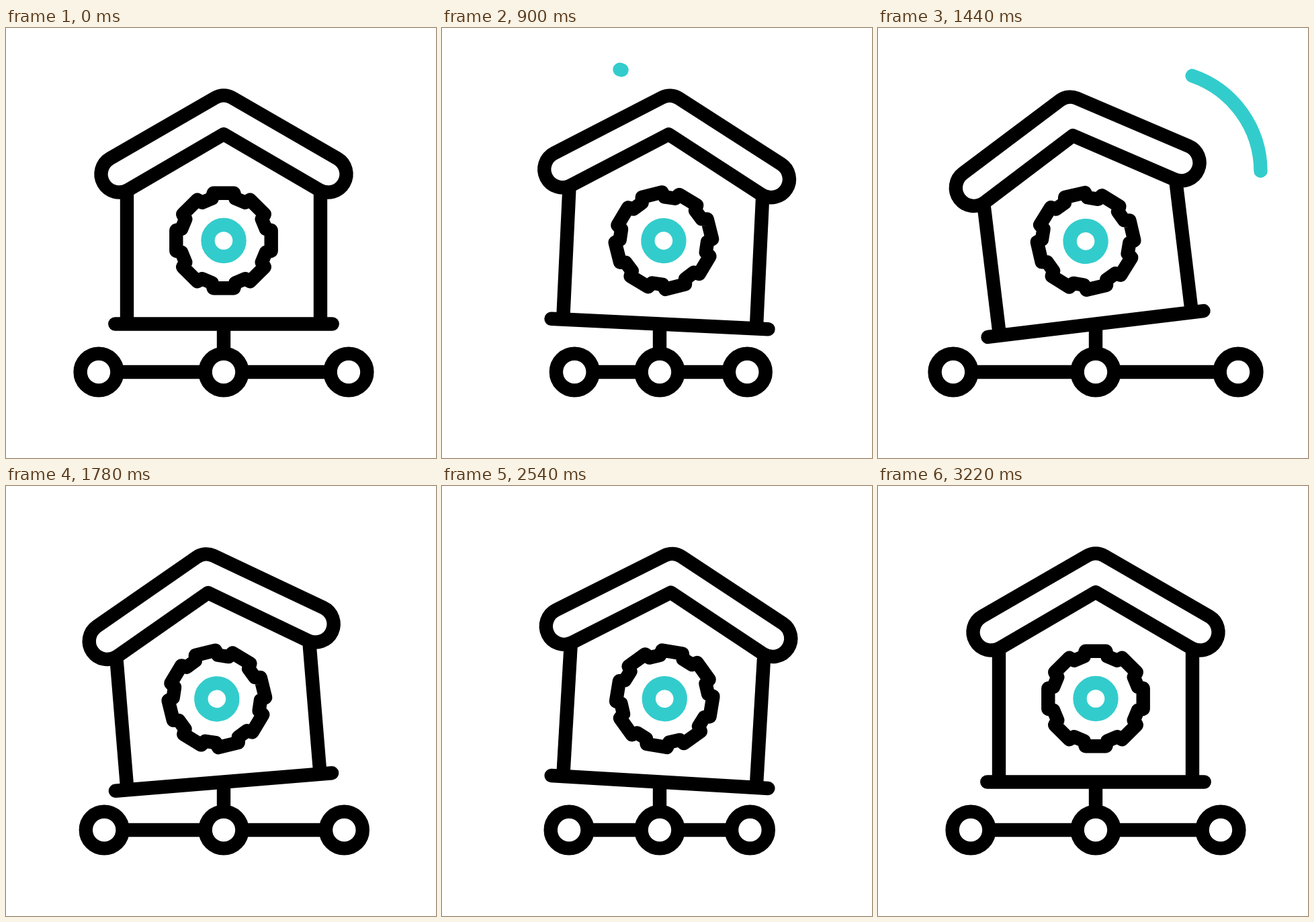
Recreate the animation shown at these times as an HTML page with a canvas. Size 640 by 640 pixels, loop 3240 ms.

```html
<!DOCTYPE html>
<html lang="en">
<head>
<meta charset="utf-8">
<title>House network</title>
<style>
  html, body { margin: 0; width: 100%; height: 100%; overflow: hidden; background: #fff; }
  canvas { display: block; width: 100vmin; height: 100vmin; }
</style>
</head>
<body>
<canvas id="stage" width="640" height="640"></canvas>
<script>
const ctx = document.getElementById('stage').getContext('2d');
const LOOP = 3240, DELAY = 210, STEP = 20;
const INK = '#000', TEAL = '#33cccc';
const RAD = Math.PI / 180, TAU = Math.PI * 2;

// [time, value] keys, counted from the end of the opening hold
const TILT = [[0, 0], [455, 4.8], [1360, -7.6], [2045, 5.3], [2740, 0]];
const LEFT = [[0, 0], [455, 81.5], [1260, -26.5], [2130, 93], [2740, -73.3], [3010, 0]];
const RIGHT = [[0, 0], [455, -77], [1260, 26.5], [2130, -87.5], [2745, 57], [3010, 0]];
const SPIN = [[0, 0], [370, -26.9], [690, -61.9], [1230, -141.2], [1910, -239], [2330, -309], [3010, -360]];

const clamp = p => Math.min(1, Math.max(0, p));
const smooth = p => p * p * (3 - 2 * p);
const ramp = (u, a, b) => smooth(clamp((u - a) / (b - a)));

// Eases in and out between neighbouring keys
function swing(keys, u) {
  for (let i = 1; i < keys.length; i++) {
    const [a, from] = keys[i - 1], [b, to] = keys[i];
    if (u <= b) return from + (to - from) * ramp(u, a, b);
  }
  return keys[keys.length - 1][1];
}

// Flowing curve through the keys
function flow(keys, u) {
  const last = keys.length - 1;
  if (u >= keys[last][0]) return keys[last][1];
  let i = 0;
  while (u > keys[i + 1][0]) i++;
  const slope = n => (keys[n + 1][1] - keys[n][1]) / (keys[n + 1][0] - keys[n][0]);
  const tangent = n => n === 0 ? slope(0) * 0.7 : n === last ? 0 : (slope(n - 1) + slope(n)) / 2;
  const [a, from] = keys[i], [b, to] = keys[i + 1];
  const d = b - a, p = (u - a) / d, q = 1 - p;
  return from + (to - from) * smooth(p) + d * p * q * (q * tangent(i) - p * tangent(i + 1));
}

function line(x1, y1, x2, y2, cap = 'butt') {
  ctx.lineCap = cap;
  ctx.beginPath();
  ctx.moveTo(x1, y1);
  ctx.lineTo(x2, y2);
  ctx.stroke();
}

function ring(x, y, r, color) {
  ctx.beginPath();
  ctx.arc(x, y, r, 0, TAU);
  ctx.fillStyle = '#fff';
  ctx.fill();
  ctx.strokeStyle = color;
  ctx.stroke();
}

function network(u) {
  const y = 512;
  const xs = [138 + swing(LEFT, u), 324, 510 + swing(RIGHT, u)];
  line(324, 440, 324, 485);
  line(xs[0], y, xs[2], y);
  xs.forEach(x => ring(x, y, 27.4, INK));
}

function roof() {
  const r = 27, y = 217.5;
  ctx.beginPath();
  ctx.moveTo(324, 158);
  ctx.arc(168.5, y, r, 60 * RAD, 240 * RAD);
  ctx.arcTo(324, 96.5, 493, 194.1, 25);
  ctx.arc(479.5, y, r, -60 * RAD, 120 * RAD);
  ctx.closePath();
  ctx.stroke();
}

function gear(angle) {
  ctx.save();
  ctx.translate(324, 316.5);
  ctx.save();
  ctx.rotate(angle * RAD);
  ctx.beginPath();
  for (let k = 0; k < 8; k++) {
    ctx.lineTo(-15.3, -70.7);
    ctx.lineTo(15.3, -70.7);
    ctx.rotate(22.5 * RAD);
    ctx.lineTo(-8, -64.7);
    ctx.lineTo(8, -64.7);
    ctx.rotate(22.5 * RAD);
  }
  ctx.closePath();
  ctx.stroke();
  ctx.restore();
  ring(0, 0, 23.5, TEAL);
  ctx.restore();
}

function house(u) {
  ctx.save();
  ctx.translate(324, 440.5);
  ctx.rotate(swing(TILT, u) * RAD);
  ctx.translate(-324, -440.5);
  line(180, 242, 180, 440);
  line(468, 242, 468, 440);
  line(162.3, 440.5, 485.7, 440.5, 'round');
  roof();
  gear(flow(SPIN, u));
  ctx.restore();
}

// A stroke that runs up one side and over the top; dir is -1 for left, 1 for right
function swoosh(u, x, y, r, dir, from, to) {
  const head = ramp(u, 90, 590), tail = ramp(u, 400, 710);
  if (head <= 0 || tail >= 1) return;
  const at = p => {
    const a = (from + (to - from) * p) * RAD;
    return dir > 0 ? -a : Math.PI + a;
  };
  ctx.strokeStyle = TEAL;
  ctx.lineCap = 'round';
  ctx.beginPath();
  ctx.arc(x, y, r, at(tail), at(head), dir > 0);
  ctx.stroke();
}

function draw(u) {
  ctx.fillStyle = '#fff';
  ctx.fillRect(0, 0, 640, 640);
  ctx.lineWidth = 20.4;
  ctx.lineJoin = 'round';
  ctx.strokeStyle = INK;
  network(u);
  house(u);
  swoosh(u, 230.5, 211, 153, -1, 5.6, 104);
  swoosh(u - 820, 419, 213.5, 150.5, 1, 0, 101);
}

const start = performance.now();
function frame() {
  const t = (performance.now() - start) % LOOP;
  draw(Math.max(0, Math.floor(t / STEP) * STEP - DELAY));
  requestAnimationFrame(frame);
}
frame();
</script>
</body>
</html>
```
